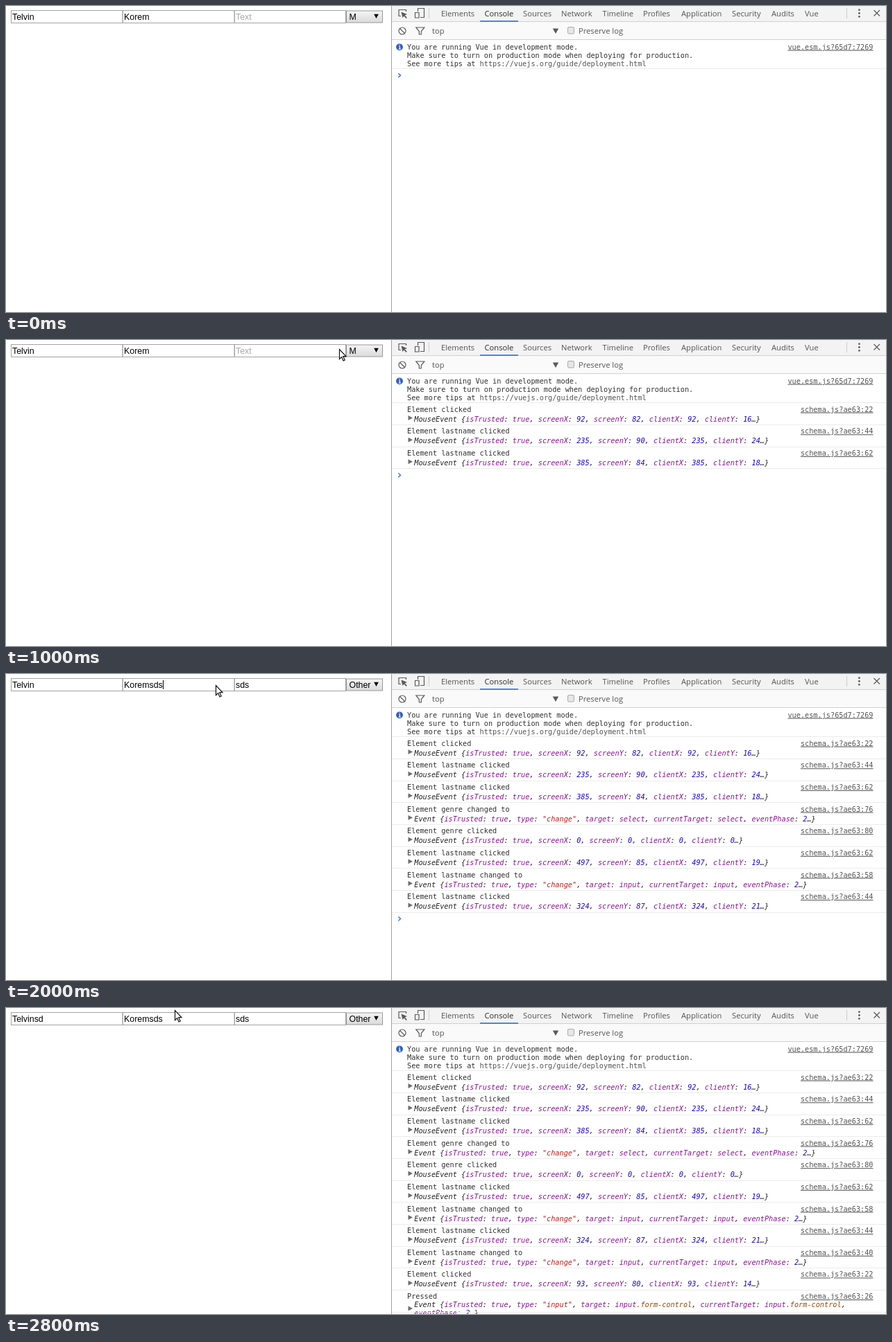
An HTML page for the animation above (3 s loop, 1268x442 px).

```html
<!DOCTYPE html>
<html lang="en">
<head>
<meta charset="utf-8">
<title>Form events in the console</title>
<style>
  html, body { margin: 0; width: 100%; height: 100%; overflow: hidden; background: #fff; }
  svg { display: block; }
  text { white-space: pre; }
  .ui { font: 11.2px "Open Sans", "Noto Sans", sans-serif; fill: #555; }
  .active { fill: #2c2c2c; }
  .field { font: 12.4px "Liberation Sans", Arial, sans-serif; fill: #000; }
  .mono { font: 10.22px "DejaVu Sans Mono", monospace; fill: #303030; }
  .link { text-anchor: end; text-decoration: underline; fill: #545454; }
  .preview { font-style: italic; fill: #222; }
  .word { fill: #881391; }
  .num { fill: #1c00cf; }
  .str { fill: #c41a16; }
  .cls { fill: #994500; }
  .icon { fill: none; stroke: #5a5a5a; stroke-width: 1.2; }
  .solid { fill: #5a5a5a; }
</style>
</head>
<body>
<svg id="stage" width="1268" height="442" viewBox="0 0 1268 442">
  <defs>
    <linearGradient id="button" x2="0" y2="1">
      <stop stop-color="#f5f5f5"/><stop offset="1" stop-color="#dadada"/>
    </linearGradient>
  </defs>
  <g id="form">
    <g fill="#fff" stroke="#a3a3a3">
      <rect x="7.5" y="6.5" width="160.5" height="18"/>
      <rect x="168.5" y="6.5" width="160.5" height="18"/>
      <rect x="329.5" y="6.5" width="160" height="18"/>
      <rect x="490.5" y="7" width="52" height="17" fill="url(#button)" stroke="#999"/>
    </g>
    <path d="M530.2 11.8h6.6l-3.3 6.2z"/>
    <rect id="caret" y="9" width="1" height="13"/>
  </g>
  <g id="tools">
    <rect x="556" width="712" height="22" fill="#f3f3f3"/>
    <rect x="556" y="23" width="712" height="25" fill="#fafafa"/>
    <path d="M556 22.5H1268M556 48.5H1268" stroke="#d0d0d0"/>
    <path d="M683 22H738" stroke="#4a86e0" stroke-width="2"/>
    <path d="M609.5 3V18M1211.5 3V18" stroke="#ccc"/>
    <path d="M555.5 0V442" stroke="#a0a0a0"/>
    <path class="icon" d="M569 14.5H566V5.5H576.5V8M593.5 8V3.5H602.5V16.5H597M589.5 9.5H595V17H589.5z"/>
    <path class="solid" d="M569.5 8.5L578 12L574.8 13.2L577.8 16.8L576.5 18L573.5 14.4L571.5 17z"/>
    <circle class="icon" cx="571" cy="36" r="5" stroke-width="1.6"/>
    <path class="icon" d="M567.5 32.5L574.5 39.5M590.8 31H602.8L598.3 36.5V41H595.3V36.5z"/>
    <path class="solid" d="M787.8 32.5h8.4l-4.2 7.5z"/>
    <rect x="809.5" y="30.5" width="9" height="9.5" rx="1.5" fill="#e6e6e6" stroke="#aaa"/>
    <g class="solid">
      <circle cx="1229.4" cy="5.7" r="1.4"/><circle cx="1229.4" cy="10.5" r="1.4"/><circle cx="1229.4" cy="15.3" r="1.4"/>
    </g>
    <path class="icon" d="M1250.5 6L1259 14.5M1259 6L1250.5 14.5" stroke-width="1.7"/>
  </g>
  <g id="console">
    <circle cx="567" cy="59.3" r="4.9" fill="#2f5fc4"/>
    <path d="M566 58.5H567.4V62M565.7 62.2H568.8M566.3 56.5H567.7" fill="none" stroke="#fff" stroke-width="1.2"/>
    <path d="M556 90.5H1268" stroke="#ececec"/>
  </g>
  <path id="prompt" d="M565.3 -3L568.5 0L565.3 3" fill="none" stroke="#3b78e0" stroke-width="1.5"/>
  <path id="cursor" d="M.5 .5V14.6L3.6 11.6L6 17L8.2 16L5.8 10.7H10z" fill="#fff" stroke="#111" stroke-width="1.2"/>
</svg>
<script>
const STEP = 200, LOOP = 3000, ROW = 31.65;
const $ = id => document.getElementById(id);

function add(parent, tag, attrs, html = '') {
  const el = document.createElementNS('http://www.w3.org/2000/svg', tag);
  for (const name in attrs) el.setAttribute(name, attrs[name]);
  el.innerHTML = html;
  parent.append(el);
  return el;
}
const label = (parent, cls, x, y, html) => add(parent, 'text', { class: cls, x, y }, html);

// Toolbar
const tabs = { Elements: 627, Console: 689.5, Sources: 745, Network: 800, Timeline: 859.5, Profiles: 918,
  Application: 973, Security: 1046, Audits: 1103, Vue: 1151 };
for (const name in tabs) label($('tools'), name === 'Console' ? 'ui active' : 'ui', tabs[name], 14.8, name);
label($('tools'), 'ui', 614, 39.8, 'top');
label($('tools'), 'ui', 825, 39.8, 'Preserve log');

// Console messages
const log = $('console');
label(log, 'mono', 578, 62.6, 'You are running Vue in development mode.');
label(log, 'mono', 578, 74.7, 'Make sure to turn on production mode when deploying for production.');
label(log, 'mono', 578, 86.8, 'See more tips at <tspan fill="#545454">https://vuejs.org/guide/deployment.html</tspan>');
label(log, 'mono link', 1249.5, 62.6, 'vue.esm.js?65d7:7269');

const paint = text => text.replace(/("\w+")|(\.form-control)|(\b\d+)|\w+/g, (m, str, cls, num) =>
  `<tspan class="${str ? 'str' : cls ? 'cls' : num ? 'num' : 'word'}">${m}</tspan>`);
const mouse = (sx, sy, cx, cy) => 'MouseEvent {' +
  paint(`isTrusted: true, screenX: ${sx}, screenY: ${sy}, clientX: ${cx}, clientY: ${cy}`) + '…}';
const change = node => 'Event {' +
  paint(`isTrusted: true, type: "change", target: ${node}, currentTarget: ${node}, eventPhase: 2`) + '…}';

const rows = [
  ['Element clicked', 22, mouse(92, 82, 92, 16)],
  ['Element lastname clicked', 44, mouse(235, 90, 235, 24)],
  ['Element lastname clicked', 62, mouse(385, 84, 385, 18)],
  ['Element genre changed to', 76, change('select')],
  ['Element genre clicked', 80, mouse(0, 0, 0, 0)],
  ['Element lastname clicked', 62, mouse(497, 85, 497, 19)],
  ['Element lastname changed to', 58, change('input')],
  ['Element lastname clicked', 44, mouse(324, 87, 324, 21)],
  ['Element lastname changed to', 40, change('input')],
  ['Element clicked', 22, mouse(93, 80, 93, 14)],
  ['Pressed', 26, 'Event {' + paint('isTrusted: true, type: "input", target: input.form-control, currentTarget: input.form-control,'),
    paint('eventPhase: 2') + '…}']
].map(([title, line, preview, extra], i) => {
  const y = i * ROW, g = add(log, 'g');
  label(g, 'mono', 578, y + 103.6, title);
  label(g, 'mono link', 1249.5, y + 103.6, 'schema.js?ae63:' + line);
  label(g, 'mono preview', 588.3, y + (extra ? 115.8 : 117.6), preview);
  if (extra) label(g, 'mono preview', 588.3, y + 127.8, extra);
  add(g, 'path', { d: `M579.5 ${y + (extra ? 114 : 109)}v7l6.5 -3.5z`, fill: '#6e6e6e' });
  add(g, 'path', { d: `M556 ${Math.round(y + 122) + .5}H1268`, stroke: '#ececec' });
  return g;
});

// Form
const fields = [9, 170, 331, 494.5].map(x => label($('form'), 'field', x, 19.8, ''));

// One entry per step: visible rows, pointer position, field holding the caret
const counts = [0, 0, 0, 1, 2, 3, 5, 6, 6, 8, 8, 11, 11, 11, 11];
const spots = [[-50, 0], [240, 298], [86, 12], [219, 19], [357, 13], [480, 13], [510, 7], [463, 17],
  [463, 17], [302, 16], [302, 16], [87, 10], [87, 10], [120, 9], [243, 3]];
const carets = { 8: 2, 10: 1, 11: 0 };

function draw(now) {
  const k = Math.floor(now % LOOP / STEP);
  const values = ['Telvin' + (k >= 11 ? 'sd' : ''), 'Korem' + (k >= 10 ? 'sds' : ''),
    k >= 8 ? 'sds' : 'Text', k >= 6 ? 'Other' : 'M'];
  fields.forEach((el, i) => el.textContent = values[i]);
  fields[2].style.fill = k >= 8 ? '#000' : '#a9a9a9';

  const active = fields[carets[k]];
  $('caret').style.display = active ? '' : 'none';
  if (active) $('caret').setAttribute('x', Math.round(+active.getAttribute('x') + active.getComputedTextLength()));

  rows.forEach((g, i) => g.style.display = i < counts[k] ? '' : 'none');
  $('prompt').setAttribute('transform', `translate(0 ${100.3 + counts[k] * ROW})`);
  $('cursor').setAttribute('transform', `translate(${spots[k]})`);
}

const start = performance.now();
function tick() {
  draw(performance.now() - start);
  requestAnimationFrame(tick);
}
tick();
</script>
</body>
</html>
```
